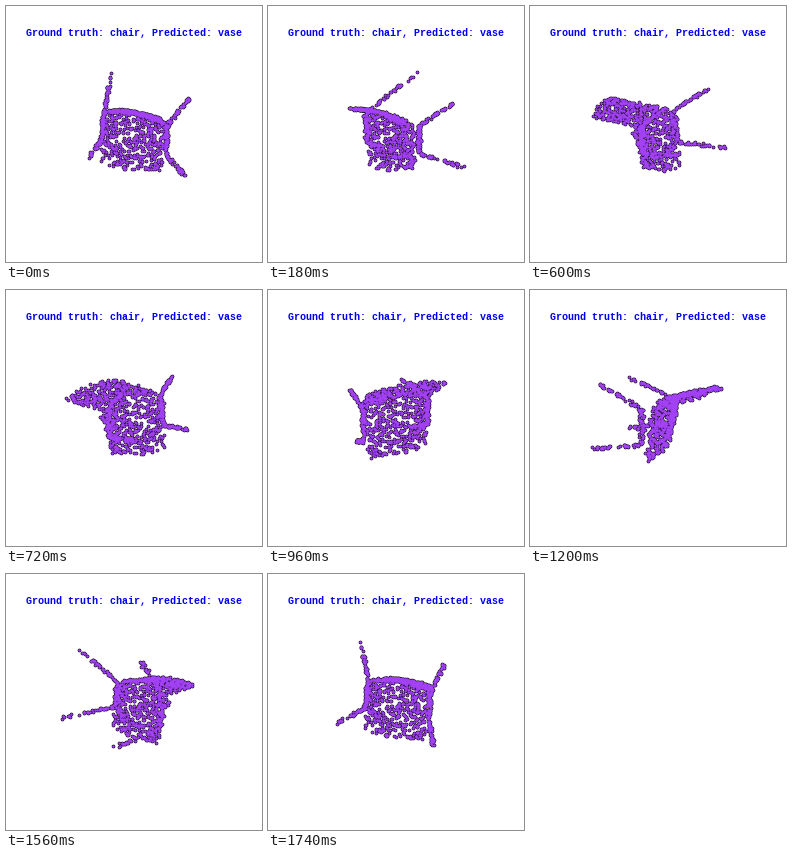
A matplotlib script that plays this animation: 256x256 px, repeating every 1.8 s.

```python
import numpy as np
import matplotlib.pyplot as plt
from matplotlib.animation import FuncAnimation

SIZE, DPI = 256, 100
FRAMES, STEP = 30, 60
CENTER = np.array([128, 121.5])
CAMERA = 200          # distance of the eye from the turning axis
PX = 72 / DPI         # points per pixel

rng = np.random.default_rng(7)


def patch(corners, n, bow, jitter):
    """Random points on a bent four-sided panel (corners: a, b, c, d)."""
    a, b, c, d = np.array(corners, float)
    s, t = rng.random((2, n, 1))
    pts = (1 - t) * ((1 - s) * a + s * b) + t * ((1 - s) * d + s * c)
    pts[:, 1:2] += 4 * s * (1 - s) * (bow[0] * (1 - t) + bow[1] * t)
    return pts + rng.uniform(-jitter, jitter, (n, 3))


def rod(start, end, n, jitter):
    """Random points along a bar."""
    t = rng.random((n, 1))
    pts = np.array(start) + t * (np.array(end) - np.array(start))
    return pts + rng.uniform(-1, 1, (n, 3)) * jitter


def chair():
    tl, tr = (-31, -16, -6), (35, -1, -14)
    br, bl = (27, 45, -3), (-33, 32, 3)
    out_tl, out_tr = (-28, -22, -57), (33, -11.5, -56)
    bases = [(-31, -14, -4), (33, -2, -3), (-33, 12, 0), (33, 29, -1)]
    tips = [(-17, -41.5, 51), (47, -26.5, 38),
            (-31, 20.5, 62), (38, 35.5, 53)]
    parts = [
        patch((tl, tr, br, bl), 430, (-4, 4), 1.2),
        patch((tl, tr, out_tr, out_tl), 300, (-5, -4), 1.1),
        rod(bases[0], bases[2], 60, (1.8, 1.5, 3)),
        rod(bases[1], bases[3], 60, (1.8, 1.5, 3)),
    ]
    parts += [rod(b, t, 40, (1.3, 1.3, 1)) for b, t in zip(bases, tips)]
    return np.vstack(parts)


def project(pts, angle):
    x, y, z = pts.T
    u = x * np.cos(angle) + z * np.sin(angle)
    depth = z * np.cos(angle) - x * np.sin(angle)
    scale = CAMERA / (CAMERA - depth)
    return np.column_stack([u * scale, y * scale]) + CENTER


fig = plt.figure(figsize=(SIZE / DPI, SIZE / DPI), dpi=DPI, facecolor="white")
ax = fig.add_axes([0, 0, 1, 1])
ax.set(xlim=(0, SIZE), ylim=(SIZE, 0))
ax.axis("off")
ax.text(SIZE / 2, 29.5, "Ground truth: chair, Predicted: vase",
        ha="center", va="baseline", color="#0000f5", weight="bold",
        family="Liberation Mono", size=10 * PX)

points = chair()
layers = [
    ax.scatter([], [], s=(width * PX) ** 2, c=color, linewidths=0, zorder=z)
    for z, (width, color) in enumerate([(3.7, "#12041c"), (2.5, "#a341f5")], 2)
]


def draw(i):
    xy = project(points, 2 * np.pi * i / FRAMES)
    for layer in layers:
        layer.set_offsets(xy)
    return layers


anim = FuncAnimation(fig, draw, frames=FRAMES, interval=STEP,
                     repeat=True, repeat_delay=0)
plt.show()
```
